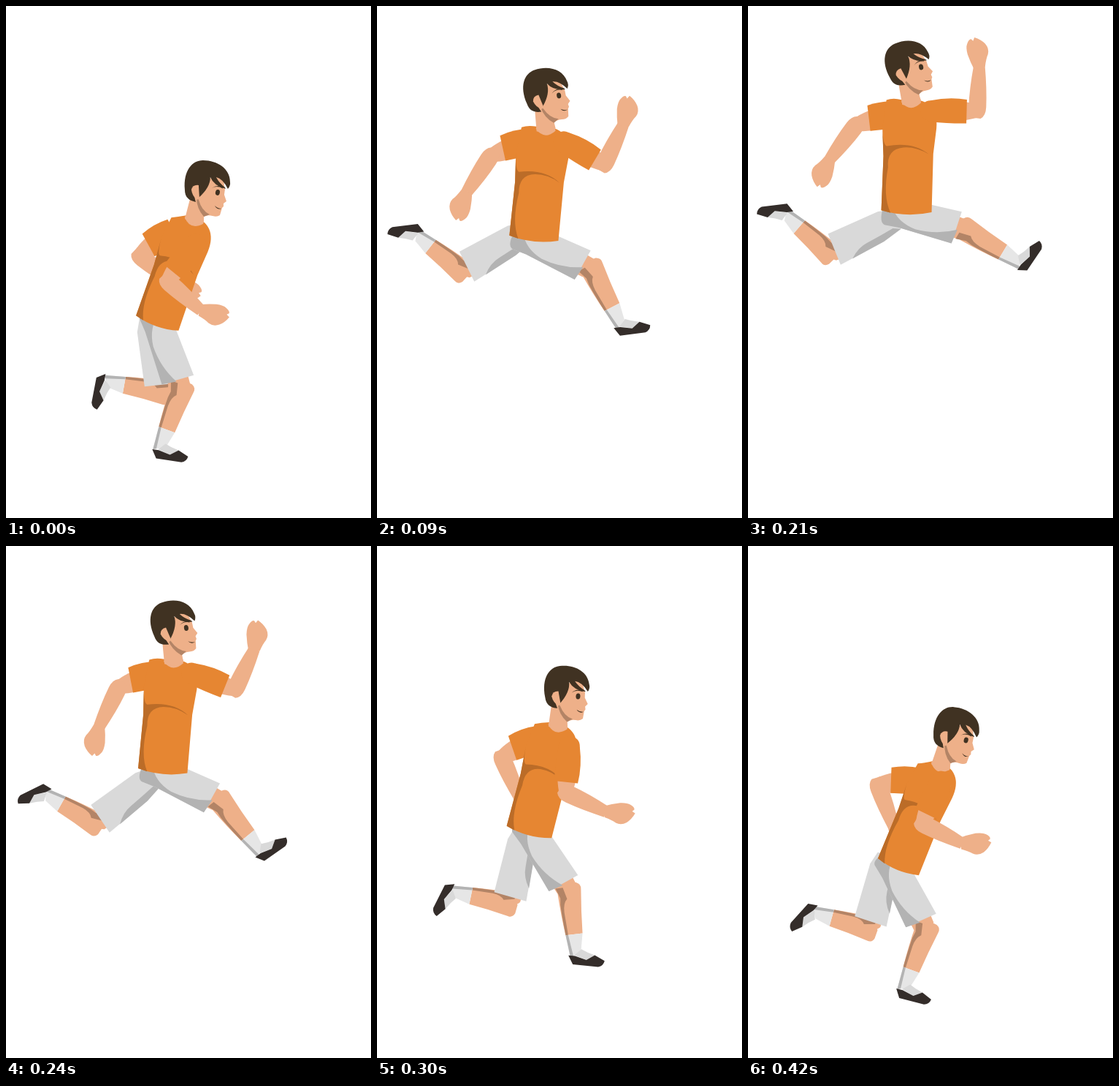
Write an HTML page with a canvas that moves like this. It is 500 px wide and 700 px high and loops after 450 ms.

```html
<!DOCTYPE html>
<html lang="en">
<head>
<meta charset="utf-8">
<title>Runner</title>
<style>
  html, body { margin: 0; width: 100%; height: 100%; overflow: hidden; background: #fff; }
  canvas { display: block; width: 500px; height: 700px; }
</style>
</head>
<body>
<canvas id="stage" width="500" height="700"></canvas>
<script>
const ctx = document.getElementById('stage').getContext('2d');

const PERIOD = 450, STEP = 30;
const KEY_TIMES = [0, 60, 150, 240, 300, 360, 420];

const COLOR = {
  skin: '#eeb089', skinShade: '#b38466', hair: '#403222',
  shirt: '#e68632', shirtShade: '#bb6c28',
  shorts: '#d9d9d9', shade: '#b3b3b3', sock: '#e6e6e6', shoe: '#342d2a'
};

// One value per key time; angles are in degrees, clockwise from the right.
const tracks = {
  neckX:     [257, 239, 219, 229, 247, 268, 263],
  neckY:     [293, 208, 116, 159, 247, 260, 301],
  tilt:      [19.5, 10.4, 0, 5.5, 15, 21.4, 22.5],
  shoulderX: [14, 24, 27.4, 26, 23, 11.4, 10],
  shoulderY: [29, 16.5, 11, 12, 20.7, 22.5, 17.5],
  farUpper:  [143, 153, 170, 161, 153, 168, 174],
  farFore:   [38, 107.5, 129, 116, 66, 78, 69],
  nearUpper: [128, 59, -8, 21, 95, 101, 115],
  nearFore:  [41, -37, -95, -65, 25, 20, 26],
  nearHand:  [8, -62, -102, -88, -2, -8, -7],
  hipX:      [5, -2, -17, -7, 6, -6, -3],
  farHipY:   [4, 0, 20, 22, 11, 22, -2],
  nearThigh: [74, 43, 10, 29, 61, 46.7, 66],
  nearShin:  [110, 90, 6, 51, 83, 60, 110.5],
  nearFoot:  [8, 19, -77, -36, 5, -36, 14],
  farThigh:  [84, 138, 165, 146, 106, 116.5, 108],
  farShin:   [190, 205.5, 238, 209.5, 191.5, 192, 195.5],
  farFoot:   [100, 151, 197, 153, 116, 116, 131.5]
};

// Limb shapes lie along the x axis, starting at their joint.
const SHAPE = {
  upperArm: 'M0-14L30-13.5Q42-12 50-9L50 9Q42 12 30 13.5L0 14Z',
  foreArm: 'M-9-7Q-5-12 6-12Q30-12 62-7.5L62 8Q30 12 6 12Q-6 12-10 5Z',
  hand: 'M-2-7.5Q8-10 20-11Q30-11 34-8Q40-4 39-1L36 1L40 4Q35 12 28 16Q20 20 13 16Q8 12-2 8Z',
  farSleeve: 'M28-17.5L28 17.5Q8 22-12 18L-12-18Z',
  nearSleeve: 'M50-16.5L50 16Q28 17 0 15Q-13 12-13 0Q-12-13 0-14Q26-20 50-16.5Z',
  thigh: 'M55-16L94-15Q102-10 102 0Q102 12 92 14L55 16Z',
  shin: 'M-14 0L-13-12Q-10-19-3-17.5Q26-14 57-12.3L57 11Q30 14-2 15Z',
  shinShade: 'M-8 17L-8 7L8 3Q13 9 26 9L57 7.5L57 11Q28 13 15 13L6 12Z',
  sock: 'M57-12.3L80-7.5L89 8L57 11Z',
  sockShade: 'M57 7.5L86 4L89 8L57 11Z',
  shoe: 'M-10 4L-3 15.5L32 16Q39 14 40 7L26 .5L15 8L-1 4Z',
  tongue: 'M-2 3L15 8L26 .5Q15-2 7-6Z',
  nearShorts: 'M-19 0L-19 8Q-18 26-10 27L10 24.5L85 22.5L85-23L20-17Q0-22-10-20Z',
  nearShortsShade: 'M-19 0L-19 8Q-18 26-10 27L10 24.5L85 22.5L87 2Q62 18 32 19.5Q5 18-8 0Z',
  farShorts: 'M-8 20L10 25L85 22.8L85-22.8L18-16L-10-9Z',
  farShortsShade: 'M67-21.5Q54-10 40-9Q20-7 0-4L-10-9L18-16Z',
  shirtShade: 'M-38 38Q-36 60-31 61Q5 53 28 70Q10 60-8 62Q-31 65-28 90Q-34 130-22 152L-35 149L-35 75Z',
  collar: 'M-13 0Q0 15 14 0L11-12L-9-12Z',
  face: 'M2-52L40-62L43-42L42-35L45-26L41-23L41-19L39-17L36-7Q32-4 26-6Q19-8 14-5L14 3Q0 8-12-2L-6-25Z',
  jawShade: 'M4-32Q4-16 14-5L22-8Q11-13 7-28Z',
  hair: 'M3-25C-6-27-12-31-12-42C-14-68-2-82 13-82C33-82 50-70 50-53Q51-47 47-43Q40-57 31-59Q35-51 43-45L44-43Q28-47 23-59Q23-45 7-31L5-48Q-2-42 3-25Z',
  ear: 'M7-48Q-1-49-3-42Q-2-33 5-28L8-31Z',
  brow: 'M25-44Q32-48 40-43.5L40-45.5Q32-49 25-44Z',
  mouth: 'M29-20Q32-14 38-16Q33-16 29-20Z'
};
for (const key in SHAPE) SHAPE[key] = new Path2D(SHAPE[key]);

const rad = deg => deg * Math.PI / 180;

// Cyclic cubic interpolation with slopes taken from the neighbouring keys.
function sample(values, t) {
  const n = KEY_TIMES.length;
  const timeAt = k => KEY_TIMES[(k + n) % n] + PERIOD * Math.floor(k / n);
  const valueAt = k => values[(k + n) % n];
  const gap = k => timeAt(k + 1) - timeAt(k);
  const rate = k => (valueAt(k + 1) - valueAt(k)) / gap(k);
  const slope = k => (gap(k) * rate(k - 1) + gap(k - 1) * rate(k)) / (gap(k - 1) + gap(k));
  let i = n - 1;
  while (KEY_TIMES[i] > t) i--;
  const h = gap(i), s = (t - timeAt(i)) / h, r = 1 - s;
  return r * r * (1 + 2 * s) * valueAt(i) + s * s * (3 - 2 * s) * valueAt(i + 1)
    + h * s * r * (r * slope(i) - s * slope(i + 1));
}

function along(from, deg, length) {
  return { x: from.x + length * Math.cos(rad(deg)), y: from.y + length * Math.sin(rad(deg)) };
}

function offset(from, deg, x, y) {
  return along(along(from, deg, x), deg + 90, y);
}

function paint(shape, color, at, deg, stretch = 1) {
  ctx.save();
  ctx.translate(at.x, at.y);
  ctx.rotate(rad(deg));
  ctx.scale(stretch, 1);
  ctx.fillStyle = color;
  ctx.fill(shape);
  ctx.restore();
}

function drawArm(shoulder, upper, fore, hand, upperLength) {
  const elbow = along(shoulder, upper, upperLength);
  const wrist = along(elbow, fore, 61);
  paint(SHAPE.upperArm, COLOR.skin, shoulder, upper, upperLength / 50);
  paint(SHAPE.foreArm, COLOR.skin, elbow, fore);
  paint(SHAPE.hand, COLOR.skin, wrist, hand);
}

function drawLeg(hip, thigh, shin, foot, thighLength, shinLength) {
  const knee = along(hip, thigh, thighLength);
  const ankle = along(knee, shin, shinLength);
  const stretch = shinLength / 83;
  paint(SHAPE.thigh, COLOR.skin, hip, thigh, thighLength / 100);
  paint(SHAPE.shin, COLOR.skin, knee, shin, stretch);
  paint(SHAPE.shinShade, COLOR.skinShade, knee, shin, stretch);
  paint(SHAPE.sock, COLOR.sock, knee, shin, stretch);
  paint(SHAPE.sockShade, COLOR.shade, knee, shin, stretch);
  paint(SHAPE.tongue, COLOR.shorts, ankle, foot);
  paint(SHAPE.shoe, COLOR.shoe, ankle, foot);
}

function drawTorso(neck, tilt) {
  const squeeze = 1 - .006 * tilt;
  const top = -3 + .5 * tilt;
  const body = new Path2D(`M-13-3Q-25 ${top - 4} -34 ${top}L-38 36L-35 75L-35 149
    Q0 158 35 149L34 69L37 34Q38 14 27 4Q20-2 13-3Z`);
  paint(body, COLOR.shirt, neck, tilt, squeeze);
  paint(SHAPE.shirtShade, COLOR.shirtShade, neck, tilt, squeeze);
}

function drawHead(neck, turn) {
  paint(SHAPE.face, COLOR.skin, neck, turn);
  paint(SHAPE.jawShade, COLOR.skinShade, neck, turn);
  paint(SHAPE.hair, COLOR.hair, neck, turn);
  paint(SHAPE.ear, COLOR.skin, neck, turn);
  paint(SHAPE.brow, COLOR.hair, neck, turn);
  paint(SHAPE.mouth, COLOR.hair, neck, turn);
  const eye = new Path2D();
  eye.ellipse(33, -38, 3, 4, .2, 0, 2 * Math.PI);
  paint(eye, COLOR.hair, neck, turn);
}

function draw(t) {
  const p = {};
  for (const key in tracks) p[key] = sample(tracks[key], t);

  const neck = { x: p.neckX, y: p.neckY };
  const pelvis = offset(neck, p.tilt, 0, 151);
  const nearHip = { x: pelvis.x + p.hipX, y: pelvis.y - 6 };
  const farHip = { x: nearHip.x - 8, y: nearHip.y + p.farHipY };
  const farShoulder = offset(neck, p.tilt, -29 * (1 - .001 * p.tilt), 18 + .7 * p.tilt);
  const nearShoulder = offset(neck, p.tilt, p.shoulderX, p.shoulderY);

  ctx.fillStyle = '#fff';
  ctx.fillRect(0, 0, 500, 700);

  drawArm(farShoulder, p.farUpper, p.farFore, p.farFore - 18, 46.5);
  drawLeg(farHip, p.farThigh, p.farShin, p.farFoot, 94, 76);
  paint(SHAPE.farShorts, COLOR.shorts, farHip, p.farThigh);
  paint(SHAPE.farShortsShade, COLOR.shade, farHip, p.farThigh);
  drawLeg(nearHip, p.nearThigh, p.nearShin, p.nearFoot, 100, 83);
  paint(SHAPE.nearShorts, COLOR.shorts, nearHip, p.nearThigh);
  paint(SHAPE.nearShortsShade, COLOR.shade, nearHip, p.nearThigh);

  paint(SHAPE.farSleeve, COLOR.shirt, farShoulder, p.farUpper + 8);
  drawTorso(neck, p.tilt);
  paint(SHAPE.collar, COLOR.skin, neck, p.tilt);
  drawHead(neck, 1.43 * p.tilt - 28);
  drawArm(nearShoulder, p.nearUpper, p.nearFore, p.nearHand, 64.5);
  paint(SHAPE.nearSleeve, COLOR.shirt, nearShoulder, p.nearUpper + 1);
}

const start = performance.now();
function tick() {
  const elapsed = (performance.now() - start) % PERIOD;
  draw(Math.floor(elapsed / STEP) * STEP);
  requestAnimationFrame(tick);
}
tick();
</script>
</body>
</html>
```
